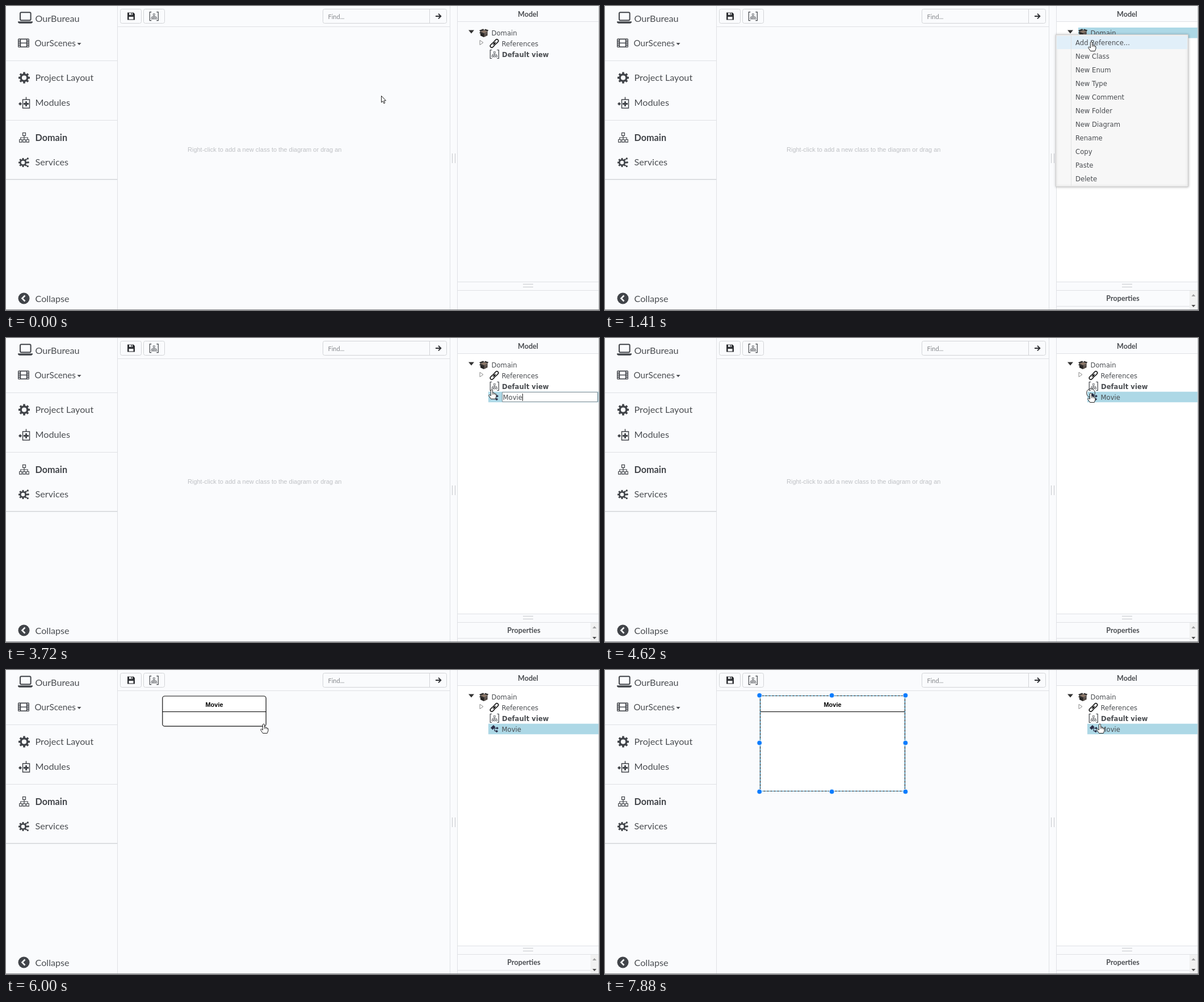
An HTML page with a canvas for the animation above (8 s loop, 1045x536 px).

```html
<!DOCTYPE html>
<html lang="en">
<head>
<meta charset="utf-8">
<title>Domain designer</title>
<style>
  html, body { margin: 0; width: 100%; height: 100%; overflow: hidden; background: #fafbfd; }
  canvas { display: block; width: 1045px; height: 536px; }
</style>
</head>
<body>
<canvas id="stage" width="1045" height="536"></canvas>
<script>
const ctx = document.getElementById('stage').getContext('2d');
const LOOP = 8000;
const BG = '#fafbfd', INK = '#414449', TEXT = '#4b4e52', LINE = '#dfe1e5', PICK = '#add8e6';
const LATO = 'Lato, sans-serif';
const TREE = '11.65px "DejaVu Sans", sans-serif';
const ARIAL = '11px "Liberation Sans", Arial, sans-serif';

// [time, x, y, shape, mouse button down]
const moves = [
  [0, 661, 158, 'arrow'], [150, 670, 154, 'arrow'], [300, 705, 146, 'arrow'],
  [450, 752, 131, 'arrow'], [600, 785, 105, 'arrow'], [720, 825, 84, 'arrow'],
  [860, 857, 51, 'hand', true], [1010, 857, 51, 'hand'],
  [1410, 857, 63, 'hand'], [1530, 856, 79, 'hand'], [1680, 856, 91, 'hand', true],
  [1960, 856, 91, 'hand'],
  [4620, 856, 97, 'hand', true], [4770, 800, 130, 'drag', true], [4890, 715, 180, 'drag', true],
  [5030, 575, 165, 'drag', true], [5180, 466, 125, 'drag', true], [5330, 345, 75, 'drag', true],
  [5460, 290, 54, 'hand'], [5580, 295, 56, 'hand'], [5730, 350, 75, 'hand'],
  [5860, 420, 90, 'hand'], [6000, 454, 95, 'hand'], [6150, 454, 95, 'hand', true],
  [6300, 461, 102, 'arrow'], [6430, 461, 102, 'arrow', true], [6570, 461, 130, 'arrow', true],
  [6690, 461, 162, 'arrow', true], [6840, 500, 200, 'arrow', true], [6990, 529, 214, 'arrow', true],
  [7120, 529, 214, 'arrow'], [7260, 595, 192, 'arrow'], [7390, 680, 165, 'arrow'],
  [7490, 755, 138, 'arrow'], [7610, 805, 118, 'arrow'], [7740, 845, 104, 'hand'],
  [7880, 872, 95, 'hand']
];

const typed = [[3040, 'M'], [3320, 'Mo'], [3450, 'Mov'], [3590, 'Movi'], [3720, 'Movie']];
const menuItems = ['Add Reference...', 'New Class', 'New Enum', 'New Type', 'New Comment',
  'New Folder', 'New Diagram', 'Rename', 'Copy', 'Paste', 'Delete'];

const at = (list, t) => list.filter(k => k[0] <= t).pop();

function rect(x, y, w, h, color) {
  ctx.fillStyle = color;
  ctx.fillRect(x, y, w, h);
}

function frame(x, y, w, h, r, fill, stroke, width = 1) {
  ctx.beginPath();
  ctx.roundRect(x, y, w, h, r);
  if (fill) { ctx.fillStyle = fill; ctx.fill(); }
  if (stroke) { ctx.strokeStyle = stroke; ctx.lineWidth = width; ctx.stroke(); }
}

function text(str, x, y, font, color = TEXT, align = 'left') {
  ctx.font = font;
  ctx.fillStyle = color;
  ctx.textAlign = align;
  ctx.fillText(str, x, y);
}

function disc(x, y, r, fill) {
  ctx.beginPath();
  ctx.arc(x, y, r, 0, 7);
  ctx.fillStyle = fill;
  ctx.fill();
}

function ring(x, y, r, color, width) {
  ctx.beginPath();
  ctx.arc(x, y, r, 0, 7);
  ctx.strokeStyle = color;
  ctx.lineWidth = width;
  ctx.stroke();
}

// SVG path placed at x, y
function path(d, x, y, { fill, stroke, width = 1 } = {}) {
  const p = new Path2D(d);
  ctx.save();
  ctx.translate(x, y);
  if (fill) { ctx.fillStyle = fill; ctx.fill(p); }
  if (stroke) { ctx.strokeStyle = stroke; ctx.lineWidth = width; ctx.stroke(p); }
  ctx.restore();
}

function gear(x, y, r, hole) {
  ctx.save();
  ctx.translate(x, y);
  for (let i = 0; i < 8; i++) {
    rect(-r * .18, -r, r * .36, r * .35, INK);
    ctx.rotate(Math.PI / 4);
  }
  ctx.restore();
  ring(x, y, (r * .76 + hole) / 2, INK, r * .76 - hole);
}

function orgChart(x, y, s) {
  ctx.save();
  ctx.translate(x, y);
  ctx.scale(s, s);
  path('M6.5 .7h5v4.6h-5z M.7 12.5h4.2v4.6h-4.2z M6.9 12.5h4.2v4.6h-4.2z M13.1 12.5h4.2v4.6h-4.2z' +
    'M9 5.5v7 M2.8 12.5v-3.5h12.4v3.5', 0, 0, { stroke: INK, width: 1.2 });
  ctx.restore();
}

function bracketChart(x, y) {
  path('M4 .7h-3v15h3 M13 .7h3v15h-3', x, y, { stroke: INK, width: 1.2 });
  orgChart(x + 3.3, y + 3.2, .58);
}

function classIcon(x, y) {
  const navy = '#2c3049';
  path('M0 5L5 0L8.5 3.5L3.5 8.5Z', x, y, { fill: navy });
  path('M6 5.5h4 M7.2 5.5v5h3', x, y, { stroke: navy, width: 1.2 });
  path('M9 5.5l2.5-2.3l2.5 2.3l-2.5 2.3z M8.2 11l2.5-2.3l2.5 2.3l-2.5 2.3z', x, y, { fill: navy });
}

function packageIcon(x, y) {
  path('M2 5l6 2.4v7.2l-6-2.6z', x, y, { fill: '#242323' });
  path('M8 7.4l6.6-2.6v7l-6.6 2.8z', x, y, { fill: '#4a423e' });
  path('M2 5l7-2.6l5.6 2.4l-6.6 2.6z', x, y, { fill: '#8b7566' });
  path('M2 5l-2-2.4l7-2.6l2 2.4z M14.6 4.8l1.6-2.6l-6-2l-1.2 2.2z M2 5l-2 2.4l5.6 2.4l2.4-2.4z', x, y, { fill: '#353230' });
  path('M9.6 9l3.4-1.4 M9.6 11.4l2-.8', x, y, { stroke: '#a3958b', width: .8 });
}

function drawSidebar() {
  rect(196, 0, 1, 535, LINE);
  rect(0, 96, 196, 1, LINE);
  rect(0, 201, 196, 1, LINE);
  rect(0, 305, 196, 1.5, '#d3d5d9');

  frame(25, 11.2, 18.6, 14, 2, null, INK, 2);
  path('M0 0h26v1.6q-1 1.9-3 1.9h-20q-2 0-3-1.9z', 21, 27.2, { fill: INK });

  frame(21, 57.5, 20, 15.5, 1.5, INK);
  for (const y of [59.2, 66]) rect(26.2, y, 9.6, 5.4, BG);
  for (let i = 0; i < 4; i++) for (const x of [22.4, 37.6]) rect(x, 59 + i * 3.6, 2, 2, BG);

  gear(32, 126.5, 10, 4.1);

  path('M6.5 1.5h12v15h-12z M12.5-3v4', 23, 163.5, { stroke: INK, width: 1.5 });
  path('M12.5 4.5v9 M8 9h9', 23, 163.5, { stroke: INK, width: 2.8 });
  path('M-1 9l3-3l3 3l-3 3z', 23, 163.5, { fill: INK });

  orgChart(23, 223, 1);

  gear(30, 276, 8, 3.3);
  path('M34 271.5l4-2.5 M33 275.8h6 M34 280l4 2.5', 0, 0, { stroke: INK, width: 1.1 });
  for (const [x, y] of [[38.3, 269], [39.2, 275.8], [38.3, 282.6]]) disc(x, y, 1.7, INK);

  disc(31.5, 515.5, 10, INK);
  path('M2.5-5l-5 5l5 5', 31, 515.5, { stroke: BG, width: 2.6 });

  const f = '16.2px ' + LATO;
  text('OurBureau', 51.5, 28, f);
  text('OurScenes', 50.5, 71, '15.2px ' + LATO);
  path('M0 0h7l-3.5 4z', 125.5, 65, { fill: TEXT });
  text('Project Layout', 51.5, 132, f);
  text('Modules', 51.5, 176, f);
  text('Domain', 51.5, 237.5, 'bold ' + f, INK);
  text('Services', 51.5, 281, f);
  text('Collapse', 51.5, 521.5, f);
}

function drawToolbar() {
  rect(197, 36, 585, 1, LINE);
  const edge = '#d2d4d7', dark = '#2d2f33';
  frame(201.5, 5.5, 37, 25, 3, BG, edge);
  frame(242.5, 5.5, 37, 25, 3, BG, edge);
  path('M0 0h10.5l2.5 2.5v10.5h-13z', 214, 11.5, { fill: dark });
  rect(217, 12.3, 6, 3.4, BG);
  rect(220.3, 12.5, 1.6, 2.8, dark);
  rect(216.5, 19, 8, 4.4, BG);
  bracketChart(252.3, 10);
  frame(558.5, 5.5, 218, 25, 3, BG, edge);
  rect(746, 6, 1, 24, edge);
  text('Find...', 567.5, 22.5, '11px ' + LATO, '#85888c');
  path('M0 0h9 M5-4.3l4.3 4.3l-4.3 4.3', 757, 18, { stroke: dark, width: 1.9 });
}

function drawPanels(open) {
  rect(782, 0, 1, 535, LINE);
  rect(795, 0, 1, 535, LINE);
  if (open) rect(796, 28, 248, 458, '#fff');
  rect(796, 27, 248, 1, LINE);
  rect(796, 486, 248, 1, LINE);
  rect(796, 501, 248, 1, LINE);
  for (const x of [786, 791]) rect(x, 260, 1, 17, '#c6c8cc');
  for (const y of [490, 495]) rect(911, y, 18, 1, '#c6c8cc');
  text('Model', 920, 18.5, 'bold 12.6px ' + LATO, TEXT, 'center');
  if (!open) return;
  text('Properties', 912.5, 520, 'bold 12.6px ' + LATO, TEXT, 'center');
  rect(796, 529, 234, 1, LINE);
  rect(1030, 502, 14, 33, '#f1f1f1');
  path('M0 4l3.5-4l3.5 4z', 1033.5, 508, { fill: '#a0a0a0' });
  path('M0 0l3.5 4l3.5-4z', 1033.5, 527, { fill: '#505050' });
}

function drawTree(t) {
  if (t >= 1010 && t < 1960) rect(834, 38, 210, 18.6, PICK);
  if (t >= 1960) rect(850, 94.7, 194, 18.6, PICK);

  path('M0 0h10l-5 6z', 815, 42.5, { fill: '#333' });
  path('M0 0l6 4l-6 4z', 835, 60.5, { stroke: '#8a8a8a' });
  packageIcon(834, 40.3);

  ctx.save();
  ctx.translate(860.5, 66);
  ctx.rotate(-Math.PI / 4);
  frame(-9, -2.7, 9.5, 5.4, 2.7, null, '#222', 1.7);
  frame(-.5, -2.7, 9.5, 5.4, 2.7, null, '#222', 1.7);
  rect(-3.5, -.7, 7, 1.4, '#222');
  ctx.restore();

  bracketChart(852.3, 76.8);
  text('Domain', 855.5, 52, TREE);
  text('References', 873.5, 71, TREE);
  text('Default view', 874, 90, 'bold ' + TREE);
  if (t < 1960) return;

  classIcon(854, 97);
  if (t >= 3870) {
    text('Movie', 873.5, 109, TREE);
    return;
  }
  frame(874.5, 95.5, 168, 17, 0, '#fff', '#7d8b92');
  const entry = at(typed, t);
  if (!entry) {
    rect(876, 97, 57, 14, '#3390ff');
    text('NewClass', 876, 109, TREE, '#fff');
  } else {
    text(entry[1], 875.5, 109, TREE);
    rect(Math.round(875.5 + ctx.measureText(entry[1]).width), 98, 1, 13, '#222');
  }
}

function drawMenu(t) {
  if (t < 1010 || t >= 1960) return;
  ctx.save();
  ctx.shadowColor = 'rgba(0,0,0,.25)';
  ctx.shadowBlur = 4;
  frame(794.5, 50.5, 233, 268, 0, '#f7f7f7', '#cfcfcf');
  ctx.restore();
  const hover = t >= 1530 ? 1 : t >= 1410 ? 0 : -1;
  menuItems.forEach((label, i) => {
    const y = 53 + i * 24;
    if (i === hover) rect(796, y, 230, 23, '#e1eff9');
    text(label, 829, y + 16, TREE);
  });
  rect(821, 52, 1, 265, '#e2e3e3');
}

function drawClass(t, cur) {
  if (t < 5460) {
    ctx.save();
    ctx.beginPath();
    ctx.rect(300, 240, 295, 30);
    ctx.clip();
    text('Right-click to add a new class to the diagram or drag an e', 320, 256.5, ARIAL, '#bfc1c5');
    ctx.restore();
    return;
  }
  const big = t >= 7120;
  const [x, y, r, b] = big ? [273.5, 45.5, 528.5, 213.5] : [275.8, 46, 458.2, 99.2];
  frame(x, y, r - x, b - y, big ? 1 : 4, '#fff', '#111', 1.2);
  rect(x, 73, r - x, 1.1, '#111');
  text('Movie', (x + r) / 2, 64.5, 'bold ' + ARIAL, '#000', 'center');
  if (t < 6150) return;

  ctx.save();
  ctx.setLineDash([3, 3]);
  const pulling = t >= 6570 && !big;
  if (pulling) frame(x, y, cur[1] - x, cur[2] - y, 0, null, '#111');
  else frame(x, y, r - x, b - y, 0, null, '#2f97c9', 1.2);
  ctx.restore();
  if (pulling) return;

  const xs = [x - 1.3, (x + r) / 2 - 1.3, r + 1], ys = [y - .8, (y + b) / 2 - 1, b + 1];
  xs.forEach((hx, i) => ys.forEach((hy, j) => {
    if (i === 1 && j === 1) return;
    disc(hx, hy, 5, '#e3effb');
    disc(hx, hy, 3.8, '#0a7cff');
  }));
}

function drawCursor([, x, y, shape, down]) {
  if (shape === 'drag') {
    ctx.save();
    ctx.globalAlpha = .78;
    rect(x + 13, y - 7, 194, 18.6, PICK);
    classIcon(x + 16, y - 5);
    text('Movie', x + 36.5, y + 7, TREE);
    ctx.restore();
    frame(x + 2, y + 10.5, 8, 5, 1, '#fff', '#333');
  }
  if (down) ring(x, y, 7.5, '#333', 1);
  if (shape === 'hand') {
    path('M-1.6 1Q0-1 1.6 1V5.7Q3.5 5.2 4 6.4Q5.5 6 6.2 7.3Q8 7.3 8 9V12L6.3 16.5H-1.4L-5.4 10.5Q-5 8.5-3.2 9.3L-1.6 11Z',
      x, y, { fill: '#fff', stroke: '#222' });
    path('M1.6 6v3 M4 6.6v2.6 M6.2 7.5v2', x, y, { stroke: '#222', width: .8 });
  } else {
    path('M.5 .5V12L3.1 9.6L4.9 13.8L6.8 13L5 8.9H8.5Z', x, y, { fill: '#fff', stroke: '#222' });
  }
}

function draw(now) {
  const t = now % LOOP;
  const cur = at(moves, t);
  rect(0, 0, 1045, 536, BG);
  drawSidebar();
  drawToolbar();
  drawPanels(t >= 1010);
  drawTree(t);
  drawClass(t, cur);
  drawMenu(t);
  rect(1044, 0, 1, 536, '#c9cbce');
  rect(0, 535, 1045, 1, '#85878a');
  drawCursor(cur);
}

function tick() {
  draw(performance.now());
  requestAnimationFrame(tick);
}
tick();
</script>
</body>
</html>
```
